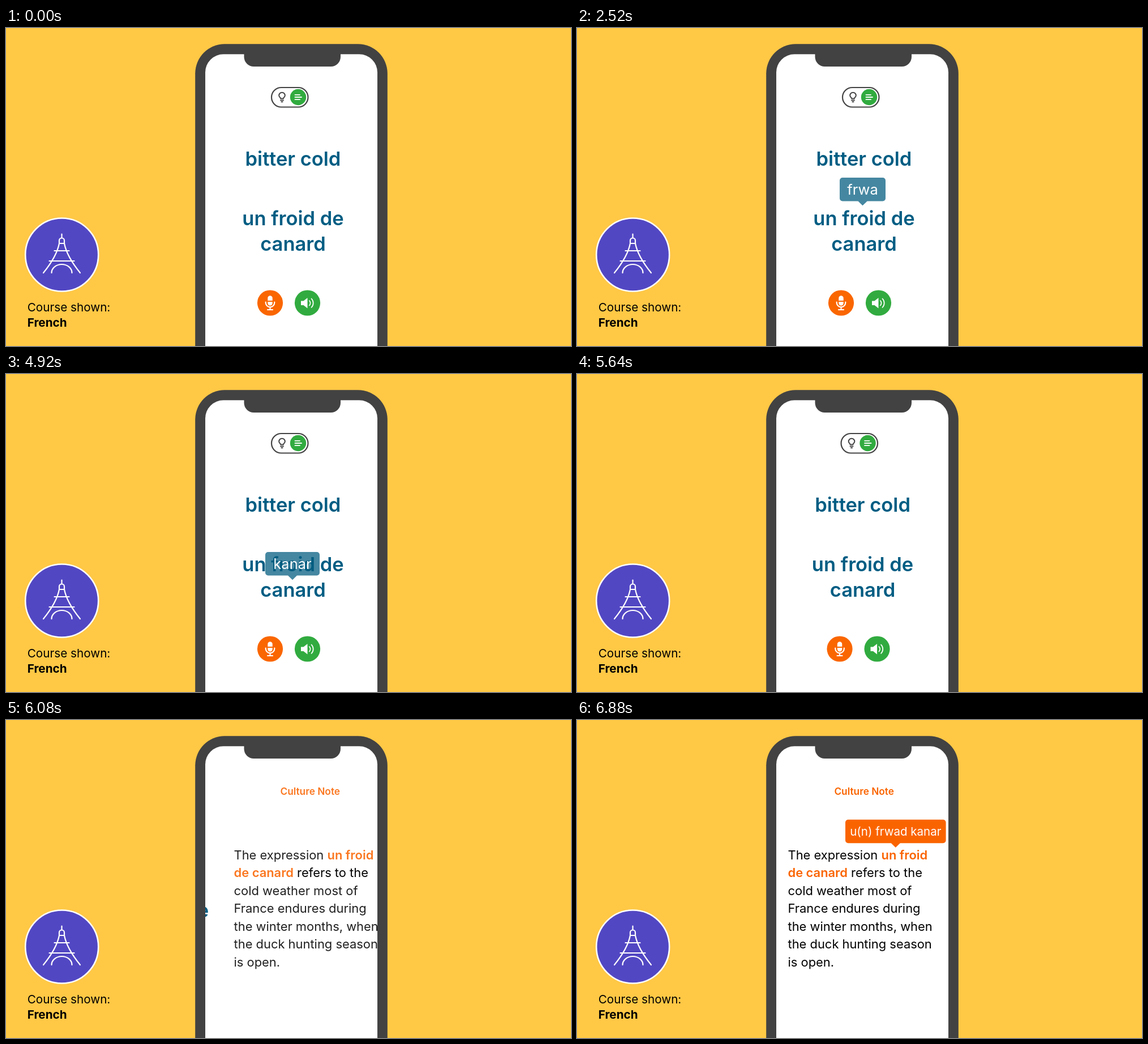
These frames come from a looping animation (998 by 561 pixels, 8000 ms). An HTML page:

```html
<!DOCTYPE html>
<html lang="en">
<head>
<meta charset="utf-8">
<title>Phrase card</title>
<style>
  html, body { margin: 0; width: 100%; height: 100%; overflow: hidden; background: #ffc845; }
  svg { display: block; width: 100vw; height: 100vh; }
  text { font-family: Inter, "Open Sans", sans-serif; font-optical-sizing: none; }
  .phrase { font-size: 34.5px; font-weight: 600; fill: #005d83; text-anchor: middle; }
  .body { font-size: 21.9px; }
  .accent { font-weight: 600; fill: #fa6400; }
  .heading { font-size: 17.3px; text-anchor: middle; }
  .caption { font-size: 20.7px; }
  .tip text { fill: #fff; text-anchor: middle; }
  .line { fill: none; stroke: #fff; stroke-width: 2.2; stroke-linecap: round; stroke-linejoin: round; }
</style>
</head>
<body>
<svg viewBox="0 0 998 561">
  <defs>
    <path id="glass" d="M352 561V78.3a32 32 0 0 1 32-32H624a32 32 0 0 1 32 32V561z"/>
    <clipPath id="screen"><use href="#glass"/></clipPath>
  </defs>
  <rect width="998" height="561" fill="#ffc845"/>

  <!-- course badge -->
  <circle cx="98.7" cy="400" r="64.5" fill="#5247c3" stroke="#fff" stroke-width="2.6"/>
  <g class="line">
    <path d="M98.5 363.5v6M94 380v-5a4.5 4.5 0 0 1 9 0v5z"/>
    <path d="M94 380C91 396 79 416 66 432M103 380C106 396 118 416 131 432"/>
    <path d="M85.5 393h26M76.5 411h44M80.5 432a18 15 0 0 1 36 0"/>
  </g>
  <text class="caption" x="37.7" y="500">Course shown:</text>
  <text class="caption" x="37.7" y="527" font-weight="700">French</text>

  <!-- phone -->
  <path d="M334.2 561V80.3a52 52 0 0 1 52-52H621.8a52 52 0 0 1 52 52V561z" fill="#424242"/>
  <use href="#glass" fill="#fff"/>

  <g clip-path="url(#screen)">
    <g id="card">
      <rect x="469" y="105" width="64.5" height="34.5" rx="17.25" fill="#fff" stroke="#444" stroke-width="2.2"/>
      <g class="line" style="stroke:#444;stroke-width:2">
        <path d="M485 124.5c0-2-2.8-2.8-2.8-5.5a5.3 5.3 0 0 1 10.6 0c0 2.7-2.8 3.5-2.8 5.5z"/>
        <path d="M485 127.5h5M486.5 130.3h2"/>
      </g>
      <circle cx="516" cy="122" r="14.2" fill="#31ab3f"/>
      <path class="line" style="stroke-width:1.8" d="M510.5 117.8h8.5M510.5 122h11.5M510.5 126.2h8.5"/>

      <text class="phrase" x="507" y="242.5">bitter cold</text>
      <text class="phrase" x="507" y="348">un froid de</text>
      <text class="phrase" x="507" y="393">canard</text>

      <circle cx="466.5" cy="485" r="22.6" fill="#fa6600"/>
      <path fill="#fff" d="M462.3 481v-4.5a4.2 4.2 0 0 1 8.4 0V481zM462.3 483h8.4v2.5a4.2 4.2 0 0 1-8.4 0z"/>
      <path class="line" d="M458.7 483.5v1a7.8 7.8 0 0 0 15.6 0v-1M466.5 492.5v4M462 497h9"/>
      <circle cx="532.5" cy="485" r="22.6" fill="#31ab3f"/>
      <path fill="#fff" d="M521 481.5h4.5l7-5.5v18.5l-7-5.5h-4.5z"/>
      <path class="line" style="stroke-width:1.7" d="M535.8 481a6 6 0 0 1 0 8.5M539.5 477.5a11 11 0 0 1 0 15.5"/>
    </g>

    <g id="note">
      <g class="fade">
        <text class="heading accent" x="507.2" y="132">Culture Note</text>
        <text class="body" x="372.5" y="245.5">The expression</text>
        <text class="body accent" x="537.5" y="245.5">un froid</text>
        <text class="body accent" x="372.5" y="277">de canard</text>
        <text class="body" x="372.5" y="308.5">cold weather most of</text>
        <text class="body" x="372.5" y="340">France endures during</text>
        <text class="body" x="372.5" y="371.5">the winter months, when</text>
        <text class="body" x="372.5" y="403">the duck hunting season</text>
        <text class="body" x="372.5" y="434.5">is open.</text>
      </g>
      <text class="body fade" x="484" y="277">refers to the</text>
    </g>
  </g>
  <path d="M420.5 45V51a17 17 0 0 0 17 17H574a17 17 0 0 0 17-17V45z" fill="#424242"/>
  <g id="tips"></g>
</svg>
<script>
  const LOOP = 8000, STEP = 40, FADE_STEPS = [0.04, 0.36, 0.68, 1];
  const SLIDE = { start: 5600, length: 800, distance: 268.5 };
  const TEAL = 'rgba(2,93,128,.76)', ORANGE = '#fa6400';

  const tips = [
    { text: 'u(n)', x: 403, y: 264, w: 68, size: 25.5, fill: TEAL, show: 280, hide: 1320 },
    { text: 'frwa', x: 464, y: 264, w: 81, size: 25.5, fill: TEAL, show: 1480, hide: 2520 },
    { text: 'deuh', x: 540.5, y: 264, w: 81, size: 25.5, fill: TEAL, show: 2680, hide: 3720 },
    { text: 'kanar', x: 458, y: 314, w: 96, size: 25.5, fill: TEAL, show: 3880, hide: 4920 },
    { text: 'u(n) frwad kanar', x: 474, y: 175.8, w: 177.6, size: 20.5, fill: ORANGE, show: 6760, hide: LOOP }
  ];

  const card = document.getElementById('card');
  const note = document.getElementById('note');
  const [noteMain, noteTail] = note.querySelectorAll('.fade');
  const clamp = v => Math.min(1, Math.max(0, v));

  function add(parent, name, attrs, content = '') {
    const el = document.createElementNS('http://www.w3.org/2000/svg', name);
    for (const key in attrs) el.setAttribute(key, attrs[key]);
    el.textContent = content;
    return parent.appendChild(el);
  }

  for (const tip of tips) {
    const { x, y, w, size } = tip, r = 5, h = 41.5, half = w / 2;
    tip.el = add(document.getElementById('tips'), 'g', { class: 'tip' });
    add(tip.el, 'path', {
      fill: tip.fill,
      d: `M${x + r} ${y}h${w - 2 * r}a${r} ${r} 0 0 1 ${r} ${r}v${h - 2 * r}a${r} ${r} 0 0 1 ${-r} ${r}` +
         `H${x + half + 8}l-8 7.8l-8 -7.8H${x + r}a${r} ${r} 0 0 1 ${-r} ${-r}V${y + r}a${r} ${r} 0 0 1 ${r} ${-r}z`
    });
    add(tip.el, 'text', { x: x + half, y: y + 21 + size * 0.36, 'font-size': size }, tip.text);
  }

  // Cubic bezier (.32, 0, .18, 1), solved by bisection.
  function ease(x) {
    let lo = 0, hi = 1;
    for (let i = 0; i < 24; i++) {
      const s = (lo + hi) / 2, q = 1 - s;
      if (0.96 * q * q * s + 0.54 * q * s * s + s ** 3 < x) lo = s; else hi = s;
    }
    return 3 * (1 - lo) * lo * lo + lo ** 3;
  }

  function fade(t, start) {
    return t < start ? 0 : FADE_STEPS[Math.min(3, Math.floor((t - start) / STEP))];
  }

  function draw(now) {
    const t = Math.floor((now % LOOP) / STEP) * STEP;
    for (const tip of tips) tip.el.setAttribute('opacity', fade(t, tip.show) - fade(t, tip.hide));
    const p = ease(clamp((t - SLIDE.start) / SLIDE.length));
    card.setAttribute('transform', `translate(${-p * SLIDE.distance})`);
    note.setAttribute('transform', `translate(${(1 - p) * SLIDE.distance})`);
    noteMain.setAttribute('opacity', clamp((t - 5800) / 320));
    noteTail.setAttribute('opacity', clamp((t - 5760) / 320));
  }

  let origin;
  function tick(now) {
    origin ??= now;
    draw(now - origin);
    requestAnimationFrame(tick);
  }
  draw(0);
  requestAnimationFrame(tick);
</script>
</body>
</html>
```
